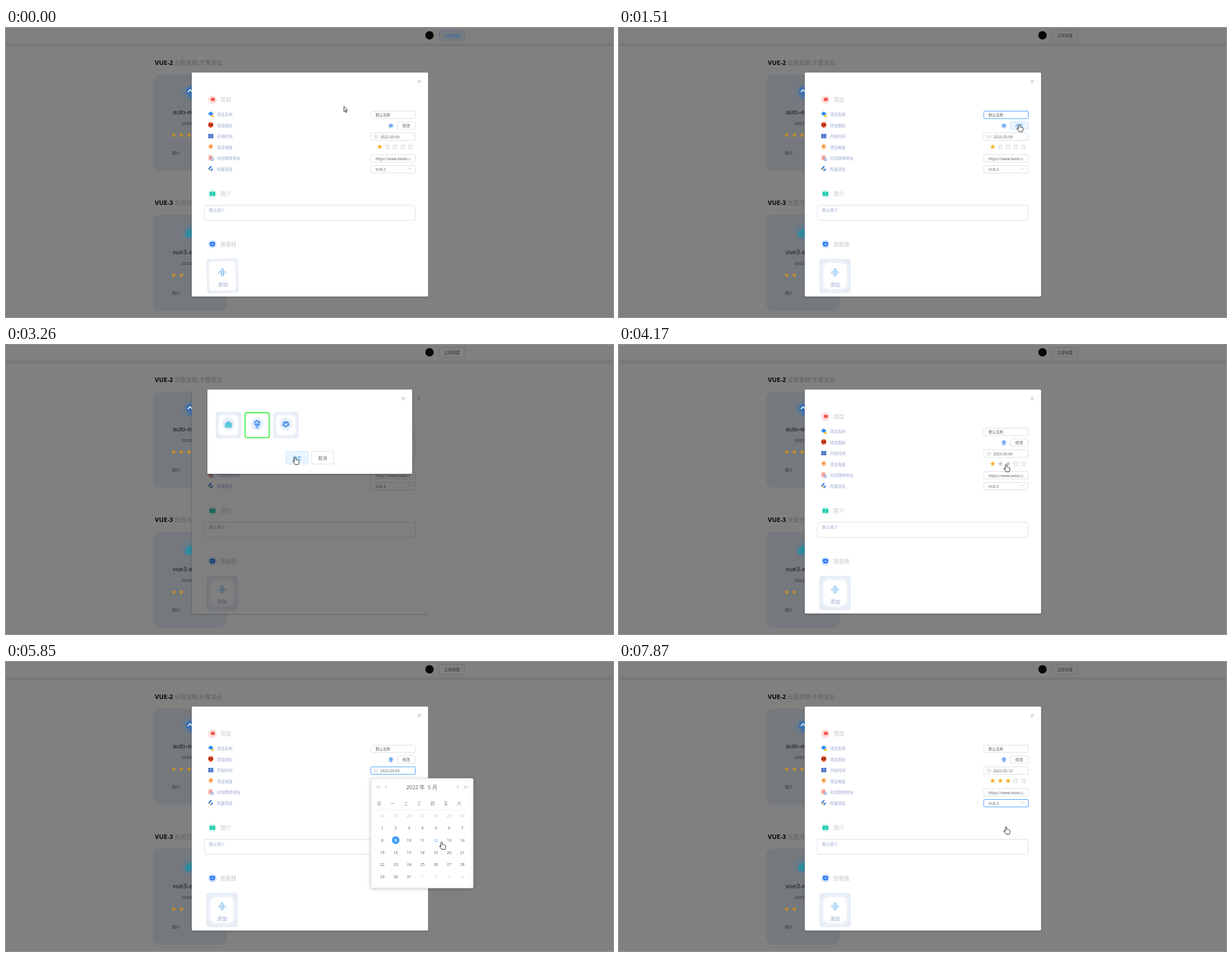
An HTML page with a canvas for the animation above (8 s loop, 1085 px wide and 516 px high).

```html
<!DOCTYPE html>
<html lang="zh-CN">
<head>
<meta charset="utf-8">
<style>
html, body { margin: 0; width: 100%; height: 100%; overflow: hidden; background: #808080; }
canvas { display: block; }
</style>
</head>
<body>
<canvas id="stage" width="1085" height="516"></canvas>
<script>
const c = document.getElementById('stage').getContext('2d');
const SANS = '"Noto Sans","Noto Sans CJK SC",sans-serif';
const ARIAL = '"Liberation Sans","Noto Sans CJK SC",sans-serif';
const BLUE = '#409eff', LINE = '#dcdfe6', TEXT = '#606266', LABEL = '#98a6d0', PALE = '#c3c6cd';
const GOLD = '#f5b32c', ICON = '#5b9bf0';
const LOOP = 8000, TICK = LOOP / 60, TRAVEL = 550;

// What the pointer visits, and when it arrives
const STOPS = [
  { t: 700, x: 690, y: 155 },   // name field
  { t: 1200, x: 716, y: 172 },  // change icon
  { t: 2000, x: 516, y: 157 },  // third tile
  { t: 2600, x: 452, y: 146 },  // second tile
  { t: 3200, x: 517, y: 200 },  // confirm
  { t: 4100, x: 692, y: 213 },  // third star
  { t: 4950, x: 690, y: 194 },  // date field
  { t: 5850, x: 779, y: 321 },  // day
  { t: 6600, x: 690, y: 252 },  // select
  { t: 7200, x: 692, y: 294 },  // option
];

const HAND = new Path2D('M-1.5 1.2Q-.1-.6 1.2 1.2V5Q2.5 4.2 3.4 5.4Q4.6 4.8 5.3 6Q6.8 5.6 6.8 7.4V9.5Q6.6 11.5 5.6 13.4H-.2Q-1.5 11.2-4 8.4Q-4.6 6.8-3 7L-1.5 8.3Z');
const ARROW = new Path2D('M0 0V9.3L2.1 7.4L3.6 10.8L5.1 10.1L3.6 6.9H6.4Z');
const BEAM = new Path2D('M-2-4.5H2M0-4.5V4.5M-2 4.5H2');

const ramp = (t, a, b) => Math.min(1, Math.max(0, (t - a) / (b - a)));
const shown = (q, from, to) => ramp(q, from, from + 280) * (1 - ramp(q, to, to + 250));
const within = (p, x, y, w, h) => p.x >= x && p.x <= x + w && p.y >= y && p.y <= y + h;
const hold = t => Math.floor((t + 20) / TICK) * TICK;

function pointer(q) {
  const p = { x: 604, y: 140 };
  for (const s of STOPS) {
    const u = ramp(q, s.t - TRAVEL, s.t), e = u * u * (3 - 2 * u);
    p.x += (s.x - p.x) * e;
    p.y += (s.y - p.y) * e;
  }
  return p;
}

function paint(fill, stroke, width = 1) {
  if (fill) { c.fillStyle = fill; c.fill(); }
  if (stroke) { c.strokeStyle = stroke; c.lineWidth = width; c.stroke(); }
}
function rect(x, y, w, h, r, fill, stroke, width) {
  c.beginPath();
  c.roundRect(x, y, w, h, r);
  paint(fill, stroke, width);
}
function disc(x, y, r, fill, stroke, width) {
  c.beginPath();
  c.arc(x, y, r, 0, 7);
  paint(fill, stroke, width);
}
function line(x, y, x2, y2, color, width = .8) {
  c.beginPath();
  c.moveTo(x, y);
  c.lineTo(x2, y2);
  paint(null, color, width);
}
// Regular polygon, or a star when dented
function poly(x, y, n, r, fill, stroke, dent = Math.cos(Math.PI / n)) {
  c.beginPath();
  for (let i = 0; i < 2 * n; i++) {
    const a = i * Math.PI / n, d = i % 2 ? r * dent : r;
    c.lineTo(x + d * Math.sin(a), y - d * Math.cos(a));
  }
  c.closePath();
  paint(fill, stroke, .8);
}
const star = (x, y, r, fill, stroke) => poly(x, y, 5, r, fill, stroke, .48);

function text(s, x, y, size, color, align = 'left', weight = 400, font = SANS) {
  c.font = `${weight} ${size}px ${font}`;
  c.textAlign = align;
  c.fillStyle = color;
  c.fillText(s, x, y + size * .37);
}
function at(x, y, draw, sx = 1, sy = sx) {
  c.save();
  c.translate(x, y);
  c.scale(sx, sy);
  draw();
  c.restore();
}
function shadowed(color, blur, dy, draw) {
  c.save();
  Object.assign(c, { shadowColor: color, shadowBlur: blur, shadowOffsetY: dy });
  draw();
  c.restore();
}
function cross(x, y) {
  for (const d of [-2.7, 2.7]) line(x - 2.7, y - d, x + 2.7, y + d, '#909399', .9);
}
function chevron(x, y, dx, dy, color = '#909399', width = .8) {
  c.beginPath();
  for (const k of [-1, 0, 1]) {
    const s = 1 - 2 * Math.abs(k);
    c.lineTo(x + (dx ? dx * s : 3 * k), y + (dx ? 2.5 * k : dy * s));
  }
  paint(null, color, width);
}
function button(s, x, y, w, h, size, hot) {
  rect(x, y, w, h, 2, hot ? '#ecf5ff' : '#fff', hot ? '#c6e2ff' : LINE);
  text(s, x + w / 2, y + h / 2 + .5, size, hot ? BLUE : TEXT, 'center');
}
// White tile whose edge colour fades inwards
function glowTile(x, y, w, h, pad, edge = '#e7edf6') {
  c.save();
  rect(x, y, w, h, 5, edge);
  c.clip();
  shadowed('#fff', pad * 1.3, 0, () => rect(x + pad, y + pad, w - 2 * pad, h - 2 * pad, pad, '#fff'));
  c.restore();
}

// Emblems, about 14 units wide around 0,0
function house(color = '#5cc9dd') {
  at(0, -2, () => poly(0, 0, 3, 8, color), 1, .5);
  rect(-6.3, -2, 12.6, 8.3, 1.2, color);
}
function badge(color = ICON) {
  poly(0, -1.6, 6, 6.2, color);
  chevron(0, -2, 0, -1.6, '#fff', 1.2);
  for (const y of [5, 7]) line(-3, y, 3, y, color, 1.1);
}
function gem() {
  at(0, 0, () => poly(0, 0, 5, 7.2, ICON), 1, -.85);
  chevron(0, .3, 0, 1.6, '#fff', 1.4);
}

function page(lit) {
  c.fillStyle = '#808080';
  c.fillRect(0, 0, 1085, 516);
  c.fillStyle = '#77787a';
  c.fillRect(0, 27, 1085, 6);
  disc(757, 13, 7.5, '#080808');
  rect(774.5, 4.5, 45, 17.5, 1.5, lit ? '#767b80' : '#808080', lit ? '#637180' : '#6e7073');
  text('立即创建', 797, 13.3, 7, lit ? '#2468a8' : '#303133', 'center');
  group(0, 'VUE-2', '云程发轫,干霄凌云', 'auto-editor', 3, () => badge('#3a70b0'));
  group(250, 'VUE-3', '光焰万丈,星汉灿烂', 'vue3-admin', 2, () => house('#2f8a9d'));
}
function group(y, name, motto, title, stars, emblem) {
  at(0, y, () => {
    text(name, 266, 61.5, 11.4, '#050505', 'left', 700);
    text(motto, 301, 62, 10.35, '#5b5c60');
    rect(263, 83, 132, 172, 13, '#75797d');
    disc(329, 114.5, 15, '#6a7987');
    at(329, 115, emblem, 1.35);
    text(title, 298, 149.5, 11.6, '#1b1c1e', 'left', 400, ARIAL);
    text('2022-05-09', 314, 170.5, 8, '#303133', 'left', 400, ARIAL);
    for (let i = 0; i < stars; i++) star(299.8 + 13.7 * i, 191.3, 4.4, '#c48d2a');
    text('简介', 296.5, 223.5, 7, '#2c2d30');
  });
}

function section(s, y, tint, emblem) {
  disc(369, y, 7.5, tint);
  at(369, y, emblem);
  text(s, 383, y, 9.7, PALE, 'left', 500);
}
function field(y, s, focus, x = 660.5) {
  rect(652, y, 79.5, 13.3, 1.5, '#fff', focus ? BLUE : LINE);
  c.save();
  c.beginPath();
  c.rect(656, y, 67, 13);
  c.clip();
  text(s, x, y + 7.2, 6.6, TEXT);
  c.restore();
}

// Form rows: label and small emblem
const ROWS = [
  ['项目名称', () => {
    at(0, -1, () => poly(0, 0, 4, 5, '#2f8df5'), 1, .8);
    disc(3, 3, 2.2, '#fbc22d');
  }],
  ['项目图标', () => {
    disc(0, -.5, 4.8, '#e5491f');
    at(0, 2.5, () => poly(0, 0, 3, 3, '#e5491f'), 1, -1);
    for (const x of [-1.9, 1.9]) disc(x, -.5, 1.4, '#5a2014');
  }],
  ['开始时间', () => {
    rect(-4.5, -4, 9, 8, .5, '#4f76c9');
    line(0, -4, 0, 4, '#aac1ef');
  }],
  ['项目难度', () => {
    disc(0, -1, 4.5, '#ffd0a0');
    at(0, 2, () => poly(0, 0, 3, 4, '#ffc48a'), 1, -.8);
    disc(0, -1, 2, '#f08022');
  }],
  ['对应跳转地址', () => {
    rect(-4, -4.5, 7, 9, 1, '#f7b5ae');
    for (const y of [-1.5, .5]) line(-2.5, y, 1.5, y, '#e0766e');
    disc(3, 2.8, 2.1, '#fff', '#4a78c8');
  }],
  ['所属项目', () => {
    line(-4, 1, 1, -4.5, '#2479e8', 2.2);
    line(-3, 3.5, .5, -.5, '#f5b93a', 1.3);
    line(0, 4, 3.5, 0, '#2479e8', 2);
  }],
];

function addTile(q) {
  const left = 1 - ramp(q, 0, 430);
  c.save();
  c.translate(386.2 + .8 * left, 442.7);
  c.rotate(-.036 * left);
  glowTile(-28.2, -30.7, 56.4, 61.4, 8 - 3 * left);
  rect(-6.5, -7.8, 13, 3.2, 1.6, '#fff', '#7cbaf0');
  rect(-1.6, -12.7, 3.2, 13, 1.6, '#fff', '#3f9ae8');
  text('添加', 0, 15.5, 9, LABEL, 'center');
  c.restore();
}

function modal(q, p, open) {
  shadowed('rgba(0,0,0,.35)', 3, 1, () => rect(332, 79.5, 422.5, 400, 2, '#fff'));
  cross(738.5, 95.5);
  section('项目', 128, '#ffdedd', () => rect(-2.8, -3.3, 7, 5.6, 1, '#f2574c'));
  section('简介', 296, '#d9f5f0', () => {
    rect(-5, -3.7, 10, 7.4, 1, '#22ccb0');
    line(0, -3.7, 0, 3.7, '#b8f2e6');
  });
  section('技能栈', 386, '#cfe0fb', () => {
    rect(-4.5, -4, 9, 8, [1, 1, 4, 4], '#2478f5');
    line(-2, 0, 2, 0, '#fff');
    line(0, -2, 0, 2, '#fff');
  });
  ROWS.forEach(([label, emblem], i) => {
    const y = 154.7 + 19.45 * i;
    at(366, y - .7, emblem);
    text(label, 377, y, 7, LABEL);
  });

  field(148.5, '默认名称', q > 690 && q < 1530);
  disc(688, 174.5, 5.6, '#e1edfc');
  at(688, 174.5, q < 3550 ? gem : () => badge(), .55);
  button('修改', 699.5, 167.7, 32, 13.3, 7, !open && within(p, 699, 167, 33, 14));
  field(187.2, q > 6140 ? '2022-05-12' : '2022-05-09', q > 5040 && q < 6340, 669);
  rect(658.5, 191.8, 6, 5, .6, null, PALE, .8);
  line(658.5, 193.6, 664.5, 193.6, PALE);
  const rated = q > 4500 ? 3 : 1;
  const over = !open && within(p, 661, 206, 70, 11) ? 1 + Math.floor((p.x - 661) / 13.7) : 0;
  for (let i = 0; i < 5; i++) {
    const fill = i < rated ? GOLD : i < over ? '#c3c8d2' : null;
    star(668 + 13.75 * i, 212.2, 4.7, fill, fill ? null : '#bfc9d8');
  }
  field(225.9, 'https://www.baidu.com');
  field(245.5, q > 7590 ? 'VUE-3' : 'VUE-2', q > 6790);
  chevron(721.5, 251, 0, q > 6890 && q < 7590 ? -1.5 : 1.5, '#b0b4bc');
  rect(354.5, 316.5, 377, 26.8, 2, '#fff', LINE);
  text('默认简介', 363, 325.3, 7, LABEL);
  addTile(q);
}

function picker(q, p, a) {
  c.save();
  c.globalAlpha = a;
  if (q > 3300) c.translate(0, -10 * (1 - a));
  shadowed('rgba(0,0,0,.3)', 3, 1, () => rect(360, 79.5, 366, 150.5, 2, '#fff'));
  cross(709.8, 95.5);
  [house, badge, gem].forEach((draw, i) => {
    const x = 374.8 + 51.3 * i;
    if (i === 1 && q > 2650) glowTile(x, 119.6, 45.6, 47, 2.6, '#45f045');
    else glowTile(x, 119.6, 45.6, 47, 6);
    disc(x + 22.8, 141, 11.5, '#e8eff9');
    at(x + 22.8, 141.3, () => draw());
  });
  button('确定', 500.5, 190, 39.5, 22.5, 8, within(p, 500, 190, 40, 23));
  button('取消', 546, 190, 39.8, 22.5, 8);
  c.restore();
}

function popup(y, w, h, a, draw) {
  if (!a) return;
  c.save();
  c.globalAlpha = a;
  c.translate(652, y);
  c.scale(1, a);
  c.translate(-652, -y);
  shadowed('rgba(0,0,0,.2)', 6, 1, () => rect(652, y, w, h, 2, '#fff', '#e4e7ed'));
  draw();
  c.restore();
}

function calendar(q, p) {
  for (const side of [-1, 1])
    for (const off of [64.2, 76.2, 79.5]) chevron(743.5 + side * off, 223, 1.2 * side, 0);
  text('2022 年', 732, 223.5, 9.3, TEXT, 'center');
  text('5 月', 762.5, 223.5, 9.3, TEXT, 'center');
  [...'日一二三四五六'].forEach((s, i) => text(s, 667 + 23.85 * i, 252, 7, TEXT, 'center'));
  line(660, 263.7, 827, 263.7, '#ebeef5', 1);
  const chosen = q > 6140 ? 12 : 9;
  for (let i = 0; i < 42; i++) {
    const x = 672.7 + 23.85 * (i % 7), y = 274.6 + 21.78 * Math.floor(i / 7);
    const n = i - 6, inside = n > 0 && n < 32;
    const hot = within(p, x - 11.9, y - 10.9, 23.8, 21.7);
    if (n === chosen) disc(x, y, 6.8, BLUE);
    const color = n === chosen ? '#fff' : !inside ? '#c0c4cc' : hot ? BLUE : TEXT;
    text(n < 1 ? n + 30 : inside ? n : n - 31, x, y + .2, 6.9, color, 'center', n === chosen ? 700 : 400);
  }
}

function options(p) {
  ['VUE-2', 'VUE-3'].forEach((s, i) => {
    const y = 270 + 19.4 * i;
    if (within(p, 652, y, 80, 19.3)) rect(652.5, y, 78.5, 19.4, 0, '#f5f7fa');
    text(s, 663, y + 9.7, 7.5, i ? TEXT : BLUE, 'left', i ? 400 : 700);
  });
}

function cursor(q, p, open, cal) {
  const column = p.x > 652 && p.x < 732;
  const inRow = (a, b) => column && p.y > a && p.y < b;
  const onDays = cal && p.y > 207;
  const beam = !open && !onDays && (inRow(148, 162) || inRow(187, 201));
  const hand = open ? within(p, 375, 119, 148, 48) || within(p, 500, 190, 86, 23)
    : onDays || p.x > 699 && inRow(167, 181) || inRow(206, 217) || inRow(245, 259) || q > 7000;
  const path = beam ? BEAM : hand ? HAND : ARROW;
  at(p.x, p.y, () => {
    c.lineWidth = 1;
    c.strokeStyle = '#222';
    c.fillStyle = '#fff';
    if (!beam) c.fill(path);
    c.stroke(path);
  });
}

function frame(now) {
  const q = hold(now % LOOP), p = pointer(q);
  const dialog = shown(q, 1530, 3550), cal = shown(q, 5150, 6250), list = shown(q, 6850, 7550);
  const open = dialog > 0;
  page(q < 690);
  modal(q, p, open);
  if (open) {
    rect(332, 79.5, 422.5, 400, 2, 'rgba(0,0,0,.5)');
    picker(q, p, dialog);
  }
  popup(208, 183, 195.5, cal, () => calendar(q, p));
  popup(266, 79.5, 47, list, () => options(p));
  cursor(q, p, open, cal);
  requestAnimationFrame(frame);
}
requestAnimationFrame(frame);
</script>
</body>
</html>
```
